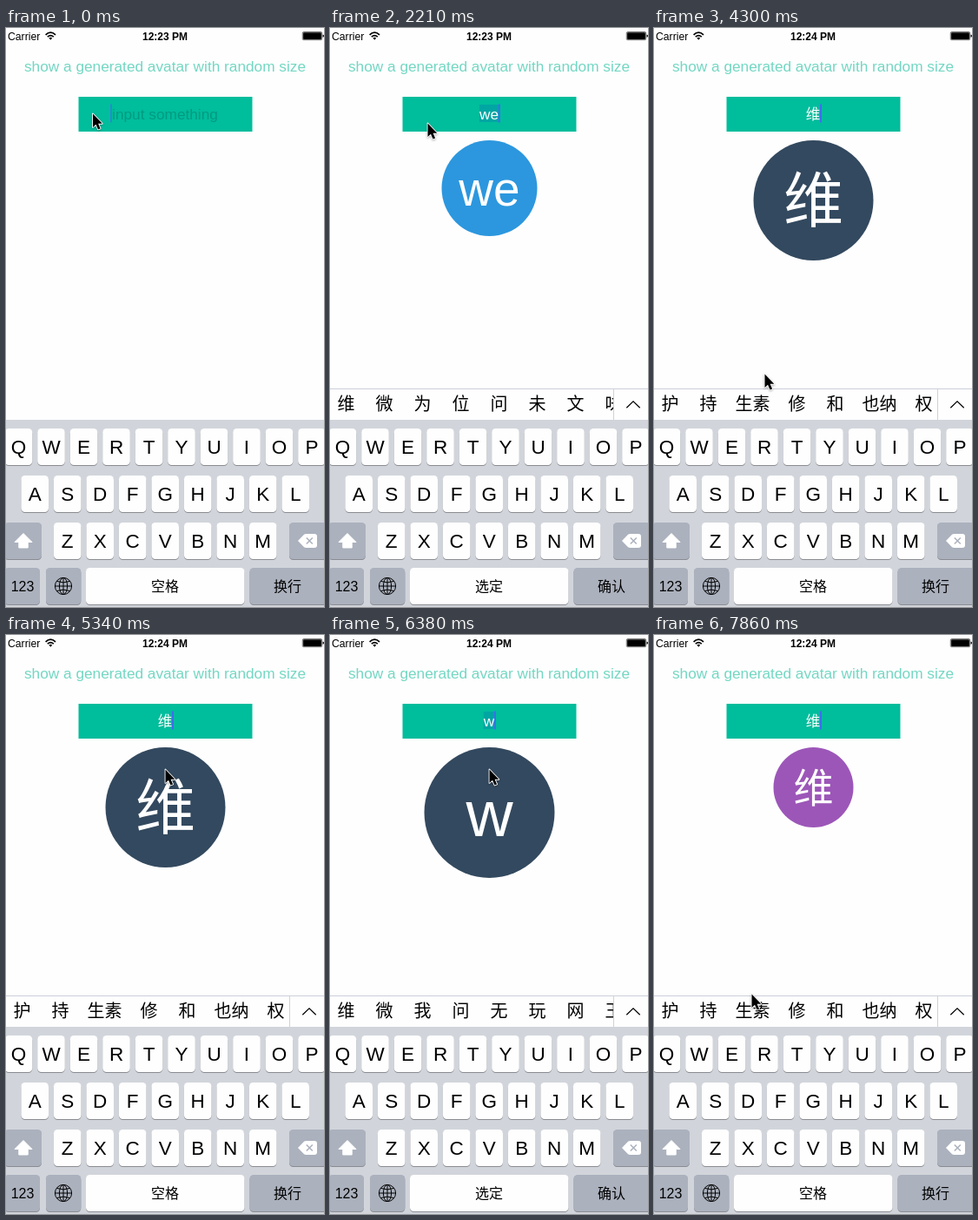
Write an HTML page that moves like this. It is 366 by 665 pixels and loops after 8000 ms.

```html
<!DOCTYPE html>
<html lang="en">
<head>
<meta charset="utf-8">
<title>Avatar generator</title>
<style>
html, body { margin: 0; width: 100%; height: 100%; overflow: hidden; background: #fefefe; }
svg { display: block; width: 366px; height: 665px; }
text { font-family: "Liberation Sans", "Noto Sans CJK SC", "Noto Sans CJK", sans-serif; white-space: pre; }
.cjk { font-family: "Noto Sans CJK SC", "Noto Sans CJK", sans-serif; font-weight: 300; }
.mid { text-anchor: middle; }
</style>
</head>
<body>
<svg id="stage" viewBox="0 0 366 665"></svg>
<script>
const LOOP = 8000, MID = 183.5;
const stage = document.getElementById("stage");

function add(tag, attrs, parent = stage, content = "") {
  const node = document.createElementNS("http://www.w3.org/2000/svg", tag);
  set(node, attrs);
  node.textContent = content;
  parent.appendChild(node);
  return node;
}
function set(node, attrs) {
  for (const k in attrs) node.setAttribute(k, attrs[k]);
}
function show(node, on) {
  node.style.display = on ? "" : "none";
}
function label(str, x, y, size, attrs = {}, parent = stage) {
  return add("text", { class: "mid", x, y, "font-size": size, ...attrs }, parent, str);
}
const isCjk = s => /[\u4e00-\u9fff]/.test(s);
const textClass = s => isCjk(s) ? "mid cjk" : "mid";

// Status bar
label("Carrier", 2, 14, 12.2, { class: "" });
const clock = label("", 183, 14, 12, { "font-weight": 700 });
const wifi = add("g", { fill: "none", stroke: "#000", "stroke-width": 1.7 });
add("path", { d: "M45.6 7.9Q51.3 2.5 57 7.9M47.8 10.2Q51.3 6.9 54.8 10.2" }, wifi);
add("path", { d: "M49.4 11.6Q51.3 10 53.2 11.6L51.3 13.7Z", fill: "#000", stroke: "none" }, wifi);
add("rect", { x: 341.3, y: 4.5, width: 22.4, height: 9.2, rx: 1.4, fill: "none", stroke: "#000", "stroke-width": 0.6 });
add("rect", { x: 342.1, y: 5.3, width: 20.8, height: 7.6, rx: 0.6 });
add("path", { d: "M364.5 7.4Q366 7.6 366 9.1T364.5 10.8Z" });

label("show a generated avatar with random size", 183, 50, 17.25, { fill: "#73d7c3" });

// Input field
add("rect", { x: 83.5, y: 79, width: 200, height: 40, fill: "#00bd9c" });
const marked = add("rect", { y: 88, height: 20, fill: "#00a6a2" });
const hint = label("input something", 183, 104.5, 17.25, { fill: "#009a80" });
const typed = label("", 183, 104.5, 17.25, { fill: "#fff" });
const caret = add("rect", { y: 87.5, width: 2, height: 21, fill: "#426bf2" });

// Avatar
const disc = add("circle", { cx: MID });
const initials = label("", MID, 0, 10, { fill: "#fff" });

// Candidate bar
const bar = add("g", {});
add("rect", { x: 0, y: 414, width: 366, height: 36, fill: "#fefefe" }, bar);
add("rect", { x: 0, y: 414, width: 366, height: 1, fill: "#cdcfdb" }, bar);
const clip = add("clipPath", { id: "clip" });
add("rect", { x: 0, y: 415, width: 326, height: 35 }, clip);
const words = add("g", { "clip-path": "url(#clip)" }, bar);
const more = add("g", {}, bar);
add("rect", { x: 326, y: 415, width: 1, height: 35, fill: "#d0d2d8" }, more);
add("path", { d: "M341.3 436.3L349 428.8L356.7 436.3", fill: "none", stroke: "#000", "stroke-width": 1.2 }, more);

// Keyboard
const GREY = "#abb1bd", PITCH = 37.5;
add("rect", { x: 0, y: 450, width: 366, height: 215, fill: "#d1d5db" });
function key(x, y, width, fill = "#fefefe") {
  const box = { x, width, height: 42, rx: 4.5 };
  add("rect", { ...box, y: y + 1, fill: "#8a8c91" });
  add("rect", { ...box, y, fill });
}
[["QWERTYUIOP", 14.5, 460], ["ASDFGHJKL", 33.2, 514], ["ZXCVBNM", 70.7, 568]].forEach(([row, x0, y]) => {
  [...row].forEach((ch, i) => {
    const x = x0 + i * PITCH;
    key(x - 15.8, y, 31.6);
    label(ch, x, y + 29, 22.5);
  });
});
key(-2, 568, 43, GREY);
key(326, 568, 43, GREY);
key(-2, 620, 41, GREY);
key(46, 620, 40.3, GREY);
key(92, 620, 182.5);
key(280.5, 620, 90, GREY);
add("path", { d: "M20 580.5L30 590.5H25.2V597H14.8V590.5H10Z", fill: "#fff", stroke: "#fff", "stroke-linejoin": "round" });
add("path", { d: "M336 589L343 581.8Q344 581 345.5 581H355Q358 581 358 584V594Q358 597 355 597H345.5Q344 597 343 596.2Z", fill: "#fff" });
add("path", { d: "M345.8 585.5L352.8 592.5M352.8 585.5L345.8 592.5", stroke: GREY, "stroke-width": 1.5 });
label("123", 19, 647, 16);
const globe = add("g", { fill: "none", stroke: "#000", "stroke-width": 1, transform: "translate(66 641)" });
add("circle", { r: 9.6 }, globe);
add("ellipse", { rx: 4.6, ry: 9.6 }, globe);
add("path", { d: "M0-9.6V9.6M-9.6 0H9.6M-7.6-5.6Q0-2.6 7.6-5.6M-7.6 5.6Q0 2.6 7.6 5.6" }, globe);
const space = label("", 183, 647, 16, { class: "mid cjk" });
const enter = label("", 324, 647, 16, { class: "mid cjk" });

const pointer = add("path", {
  d: "M0 0V15.4L3.5 12.2L6 18L8.6 16.9L6.1 11.3H10.8Z",
  stroke: "#fff", "stroke-width": 1.8, "stroke-linejoin": "round", "paint-order": "stroke",
  style: "filter: drop-shadow(0 1px 1px rgba(0,0,0,.3))"
});

// Timeline: each step changes part of the state
const BLUE = "#2c97de", NAVY = "#33495f", GREEN = "#1fce6d", PURPLE = "#9c56b8";
const LISTS = {
  w: "维 微 我 问 无 玩 网 王",
  we: "维 微 为 位 问 未 文 味",
  wei: "维 微 为 位 未 味 喂 胃",
  "维": "护 持 生素 修 和 也纳 权"
};
const type = (text, size, color) => ({ text, size, color, caret: 1 });
const at = (x, y) => ({ x, y });
const steps = [
  [0, { text: "", size: 0, color: BLUE, caret: 0.6, x: 100, y: 98.5, time: "12:23 PM" }],
  [150, { caret: 0, ...at(112.5, 109.5) }],
  [590, { caret: 1 }],
  [1030, { caret: 0.5 }],
  [1180, { caret: 0 }],
  [1470, { caret: 0.5 }],
  [1620, { caret: 1 }],
  [1760, type("w", 179, GREEN)],
  [2210, type("we", 110, BLUE)],
  [2810, { caret: 0.5 }],
  [2960, { caret: 0 }],
  [3260, type("wei", 124, PURPLE)],
  [3400, at(92, 200)],
  [3550, { time: "12:24 PM", ...at(48, 350) }],
  [3700, at(20, 424)],
  [3850, at(18, 428)],
  [4000, type("维", 138, NAVY)],
  [4150, at(56, 424)],
  [4300, at(127.5, 397.5)],
  [4440, at(158, 290)],
  [4590, at(178, 185)],
  [4740, { caret: 0.5, ...at(183.5, 154.5) }],
  [4890, { caret: 0 }],
  [5340, { caret: 1 }],
  [5640, type("", 181, BLUE)],
  [6230, type("w", 150, NAVY)],
  [6530, type("we", 118, PURPLE)],
  [6980, { ...type("wei", 137, GREEN), ...at(116.5, 327.5) }],
  [7130, at(52, 406)],
  [7280, at(18, 428)],
  [7570, type("维", 92, PURPLE)],
  [7720, at(54, 423)],
  [7860, at(112.5, 412.5)]
];

function fillWords(text) {
  words.textContent = "";
  if (!text) return;
  let x = -3.5;
  for (const word of LISTS[text].split(" ")) {
    const cell = word.length > 1 ? 58 : 44;
    label(word, x + cell / 2, 439, 20, { class: "mid cjk" }, words);
    x += cell;
  }
}

let lastCount = 0;
function draw(t) {
  const past = steps.filter(s => s[0] <= t);
  if (past.length === lastCount) return;
  lastCount = past.length;
  const s = Object.assign({}, ...past.map(p => p[1]));
  const composing = /^w/.test(s.text);

  clock.textContent = s.time;
  show(hint, !s.text);
  typed.textContent = s.text;
  set(typed, { class: textClass(s.text), "font-size": isCjk(s.text) ? 16.5 : 17.25 });
  const width = s.text ? typed.getComputedTextLength() : 0;
  show(marked, composing);
  set(marked, { x: 183 - width / 2, width: width + 0.5 });
  set(caret, { x: s.text ? 183 + width / 2 - 0.2 : 120, opacity: s.caret });

  const r = s.size / 2, cy = 129 + r;
  set(disc, { r, cy, fill: s.color });
  initials.textContent = s.text.slice(0, 2);
  set(initials, { class: textClass(s.text), y: cy + 0.365 * r, "font-size": r });

  show(bar, s.size > 0);
  show(more, s.text);
  fillWords(s.text);
  space.textContent = composing ? "选定" : "空格";
  enter.textContent = composing ? "确认" : "换行";
  set(pointer, { transform: `translate(${s.x} ${s.y})` });
}

const start = performance.now();
function tick() {
  draw((performance.now() - start) % LOOP);
  requestAnimationFrame(tick);
}
tick();
</script>
</body>
</html>
```
